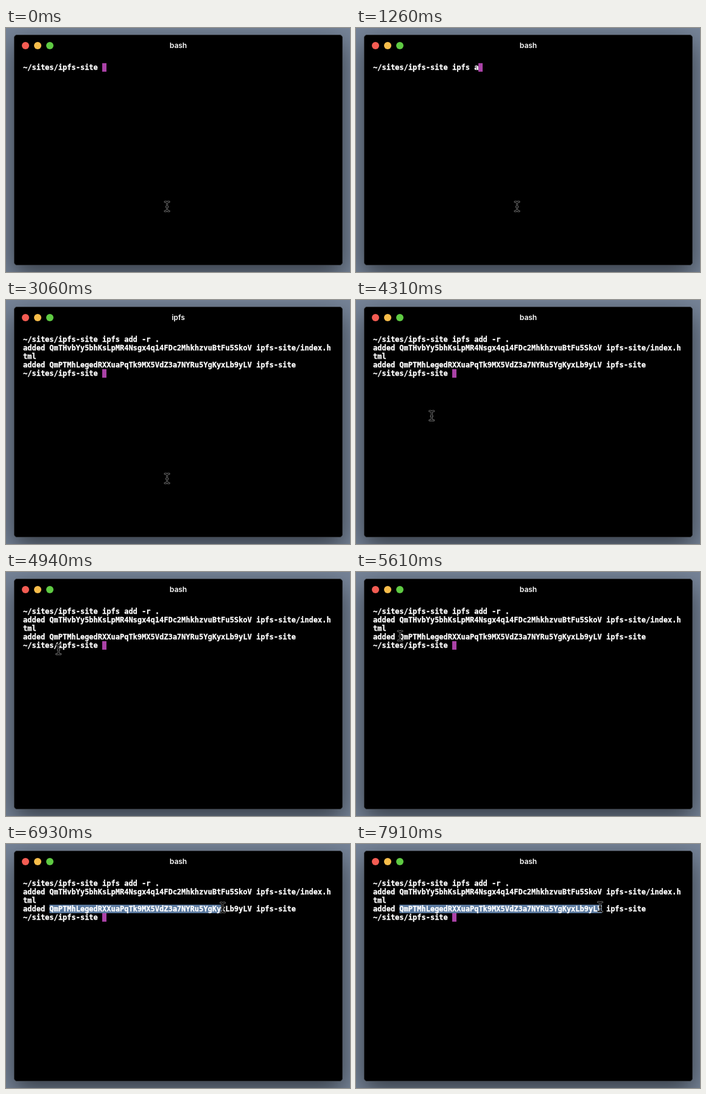
An HTML page with a canvas that plays this animation: 565 px wide and 402 px high, repeating every 8 s.

```html
<!DOCTYPE html>
<html lang="en">
<head>
<meta charset="utf-8">
<title>Terminal</title>
<style>
  html, body { margin: 0; width: 100%; height: 100%; overflow: hidden; background: #768498; }
  canvas { display: block; width: 565px; height: 402px; }
</style>
</head>
<body>
<canvas id="stage"></canvas>
<script>
const W = 565, H = 402, LOOP = 8000;
const LEFT = 28, TOP = 58, ROW = 14, COL = 7.224;
const PROMPT = '~/sites/ipfs-site ';
const COMMAND = 'ipfs add -r .';
const OUTPUT = [
  'added QmTHvbYy5bhKsLpMR4Nsgx4q14FDc2MhkhzvuBtFu5SkoV ipfs-site/index.h',
  'tml',
  'added QmPTMhLegedRXXuaPqTk9MX5VdZ3a7NYRu5YgKyxLb9yLV ipfs-site',
  PROMPT
];
const HASH_START = 6, HASH_END = 52;
const ENTER = 2590, RUN = 2830, DONE = 3720, DRAG = 5970;

// Typing comes in bursts of evenly spaced keys
const BURSTS = [
  { at: 650, keys: 5, gap: 90 },
  { at: 1260, keys: 1, gap: 90 },
  { at: 1460, keys: 7, gap: 100 }
];

const smooth = u => u * u * (3 - 2 * u);
const easeOut = u => u * (2 - u);

// Pointer moves; bend makes the vertical part lag (>1) or lead (<1)
const HOME = { x: 264.5, y: 294 };
const MOVES = [
  { from: 3690, to: 4560, x: 89.5, y: 133, ease: smooth, bend: 2 },
  { from: 4740, to: 5460, x: 72.5, y: 105, ease: smooth, bend: 1 },
  { from: 5960, to: 6440, x: 308.5, y: 109, ease: smooth, bend: 1 },
  { from: 6690, to: 7490, x: 401, y: 103.5, ease: easeOut, bend: 0.3 }
];

const canvas = document.getElementById('stage');
const ctx = canvas.getContext('2d');
const scale = window.devicePixelRatio || 1;
canvas.width = W * scale;
canvas.height = H * scale;

const clamp = (v, lo, hi) => Math.max(lo, Math.min(hi, v));

function pointerAt(t) {
  let { x, y } = HOME;
  for (const m of MOVES) {
    const e = m.ease(clamp((t - m.from) / (m.to - m.from), 0, 1));
    x += (m.x - x) * e;
    y += (m.y - y) * Math.pow(e, m.bend);
  }
  return { x, y };
}

function typedAt(t) {
  return BURSTS.reduce((n, b) =>
    n + clamp(Math.floor((t - b.at) / b.gap) + 1, 0, b.keys), 0);
}

function drawWindow() {
  ctx.fillStyle = '#768498';
  ctx.fillRect(0, 0, W, H);
  ctx.save();
  ctx.shadowColor = 'rgba(0,0,0,.55)';
  ctx.shadowBlur = 40 * scale;
  ctx.shadowOffsetY = 15 * scale;
  ctx.fillStyle = '#000';
  ctx.beginPath();
  ctx.roundRect(13.5, 11.5, 539, 379, 4.5);
  ctx.fill();
  ctx.restore();
  ctx.strokeStyle = '#2b2e33';
  ctx.lineWidth = 1;
  ctx.stroke();
  ['#f45c53', '#f7bd4a', '#5fcb43'].forEach((color, i) => {
    ctx.fillStyle = color;
    ctx.beginPath();
    ctx.arc(32 + 20 * i, 29, 6, 0, Math.PI * 2);
    ctx.fill();
  });
}

function drawTitle(text) {
  ctx.font = '600 12px Inter, Roboto, sans-serif';
  ctx.textAlign = 'center';
  ctx.fillStyle = '#fff';
  ctx.fillText(text, 283, 33);
}

function drawSelection(x) {
  const end = clamp(Math.round((x - LEFT) / COL), HASH_START, HASH_END);
  ctx.fillStyle = '#5a799f';
  ctx.fillRect(LEFT + HASH_START * COL, TOP + 3 * ROW, (end - HASH_START) * COL, ROW);
}

function drawRows(rows) {
  ctx.font = 'bold 12px "DejaVu Sans Mono", Menlo, monospace';
  ctx.textAlign = 'left';
  ctx.fillStyle = ctx.strokeStyle = '#fff';
  ctx.lineWidth = 0.3;
  rows.forEach((text, i) => {
    const y = TOP + 11 + i * ROW;
    ctx.fillText(text, LEFT, y);
    ctx.strokeText(text, LEFT, y);
  });
}

function drawCaret(row, col) {
  ctx.fillStyle = '#aa42a7';
  ctx.fillRect(Math.round(LEFT + col * COL), TOP + row * ROW, 7, ROW);
}

function drawPointer({ x, y }) {
  ctx.save();
  ctx.translate(x, y);
  ctx.beginPath();
  for (const s of [-1, 1]) {
    ctx.moveTo(s * 3.5, -7.7);
    ctx.lineTo(s * 2.2, -7.7);
    ctx.quadraticCurveTo(0, -7.7, 0, -5.5);
    ctx.lineTo(0, 5.5);
    ctx.quadraticCurveTo(0, 7.7, s * 2.2, 7.7);
    ctx.lineTo(s * 3.5, 7.7);
  }
  ctx.moveTo(-1.2, 0.5);
  ctx.lineTo(1.2, 0.5);
  ctx.lineJoin = ctx.lineCap = 'round';
  ctx.strokeStyle = '#858585';
  ctx.lineWidth = 3;
  ctx.stroke();
  ctx.strokeStyle = '#000';
  ctx.lineWidth = 1.4;
  ctx.stroke();
  ctx.restore();
}

function draw(t) {
  ctx.setTransform(scale, 0, 0, scale, 0, 0);
  const pointer = pointerAt(t);
  const printed = clamp(Math.floor((t - RUN) / 55), 0, OUTPUT.length);
  const rows = [PROMPT + COMMAND.slice(0, typedAt(t)), ...OUTPUT.slice(0, printed)];

  drawWindow();
  drawTitle(t >= RUN && t < DONE ? 'ipfs' : 'bash');
  if (t >= DRAG) drawSelection(pointer.x);

  // While the command runs the caret waits on the next empty row
  if (t >= ENTER && printed < OUTPUT.length) drawCaret(rows.length, 0);
  else drawCaret(rows.length - 1, rows[rows.length - 1].length);
  drawRows(rows);
  drawPointer(pointer);
}

const start = performance.now();
function tick() {
  draw((performance.now() - start) % LOOP);
  requestAnimationFrame(tick);
}
tick();
</script>
</body>
</html>
```
